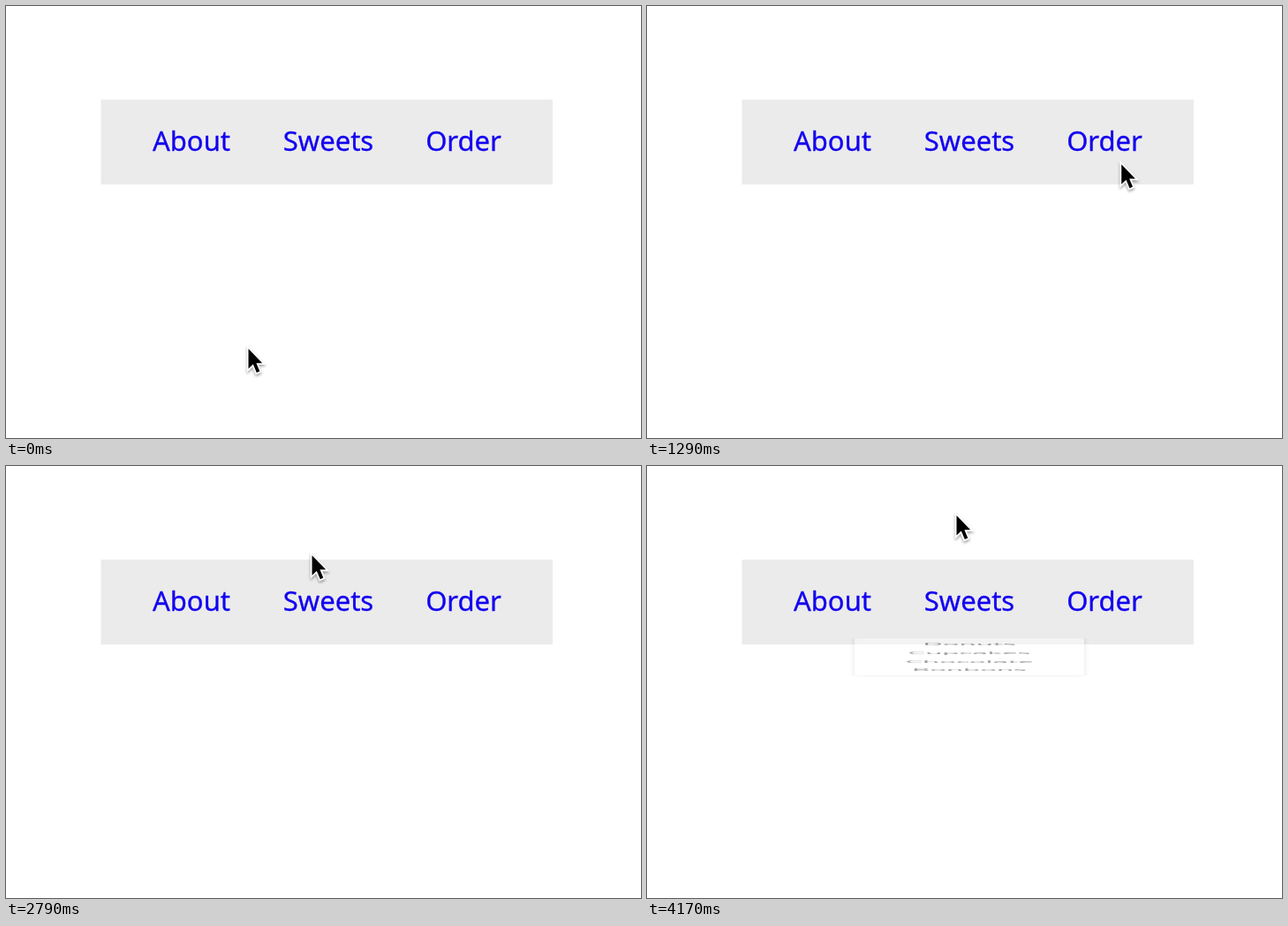
These frames come from a looping animation (719x489 px, 4210 ms). An HTML page:

```html
<!DOCTYPE html>
<html lang="en">
<head>
<meta charset="utf-8">
<title>Dropdown with delayed close</title>
<style>
  html, body { margin: 0; width: 100%; height: 100%; overflow: hidden; background: #fff; }
  svg { display: block; width: 719px; height: 489px; }
  text { font: 31px "Noto Sans", sans-serif; text-anchor: middle; stroke-width: .3; stroke-linejoin: round; }
  .links { fill: #1200f0; stroke: #1200f0; }
  .items { fill: #3a3a3a; stroke: #3a3a3a; }
  .panel { fill: #fff; filter: drop-shadow(0 2px 3px rgba(0, 0, 0, .25)); }
  #arrow { filter: drop-shadow(0 2px 1.5px rgba(0, 0, 0, .35)); }
  #beam { fill: none; stroke-linecap: round; }
</style>
</head>
<body>
<svg viewBox="0 0 719 489">
  <defs>
    <path id="beamShape" d="M-5.5 -14Q0 -14 0 -9V9Q0 14 -5.5 14M5.5 -14Q0 -14 0 -9M0 9Q0 14 5.5 14M-3 2H3"/>
  </defs>
  <rect x="107.5" y="106" width="511.5" height="96" fill="#ebebeb"/>
  <g class="links">
    <text x="210" y="164">About</text>
    <text x="365" y="164">Sweets</text>
    <text x="518" y="164">Order</text>
  </g>
  <g id="menu">
    <rect class="panel" x="235" width="260" height="310" rx="7"/>
    <g class="items" id="items"></g>
  </g>
  <g id="arrow">
    <path d="M.5 2V24.5L5.8 19.5L9.8 29L13.3 27.4L9.4 18.2H16.2Z" stroke="#fff" stroke-width="3.6" paint-order="stroke"/>
  </g>
  <g id="beam">
    <use href="#beamShape" stroke="#fff" stroke-width="4"/>
    <use href="#beamShape" stroke="#000" stroke-width="2"/>
  </g>
</svg>
<script>
const LOOP = 4210;
const $ = id => document.getElementById(id);
const menu = $('menu'), arrow = $('arrow'), beam = $('beam');

$('items').innerHTML = ['Donuts', 'Cupcakes', 'Chocolate', 'Bonbons']
  .map((name, i) => `<text x="365" y="${60 + 70.3 * i}">${name}</text>`).join('');
const linkBoxes = [...document.querySelectorAll('.links text')].map(link => link.getBBox());

// Turning points of the pointer
const keys = [
  { t: 40, x: 274, y: 386 },
  { t: 330, x: 262, y: 150 },
  { t: 500, x: 286, y: 12, hold: 170 },
  { t: 830, x: 338, y: 66 },
  { t: 1030, x: 420, y: 264 },
  { t: 1190, x: 500, y: 152 },
  { t: 1360, x: 548, y: 205 },
  { t: 1660, x: 435, y: 331 },
  { t: 1830, x: 396, y: 245 },
  { t: 2210, x: 346, y: 27, hold: 80 },
  { t: 2790, x: 346, y: 99 },
  { t: 3010, x: 350, y: 147, hold: 700 },
  { t: 3900, x: 350, y: 54 }
];

const clamp = v => Math.max(0, Math.min(1, v));
const smooth = v => v * v * (3 - 2 * v);
const leave = key => key.t + (key.hold || 0);
const slope = (i, axis) => (keys[i + 1][axis] - keys[i][axis]) / (keys[i + 1].t - leave(keys[i]));

// The pointer rests at pauses and at the extremes of each axis
function speed(i, axis) {
  if (i === 0 || i === keys.length - 1 || keys[i].hold) return 0;
  const a = slope(i - 1, axis), b = slope(i, axis);
  return a * b <= 0 ? 0 : 2 * a * b / (a + b);
}

// Monotone cubic interpolation of one axis
function along(t, axis) {
  let i = 0;
  while (i < keys.length - 2 && t >= keys[i + 1].t) i++;
  const from = keys[i], to = keys[i + 1], span = to.t - leave(from);
  const u = clamp((t - leave(from)) / span);
  return from[axis] + (to[axis] - from[axis]) * smooth(u)
    + span * u * (1 - u) * ((1 - u) * speed(i, axis) - u * speed(i + 1, axis));
}

function draw(now) {
  const t = now % LOOP;
  const x = along(t, 'x'), y = along(t, 'y');
  const overText = linkBoxes.some(b => x > b.x && x < b.x + b.width && y > b.y && y < b.y + b.height);
  arrow.style.display = overText ? 'none' : '';
  beam.style.display = overText ? '' : 'none';
  (overText ? beam : arrow).setAttribute('transform', `translate(${x} ${y})`);

  const open = 1 - (1 - clamp((t - 2950) / 240)) ** 2;
  const close = smooth(clamp((t - 3970) / 262));
  menu.style.display = open > 0 ? '' : 'none';
  menu.setAttribute('opacity', open * (1 - .64 * close));
  menu.setAttribute('transform', `translate(0 195) scale(1 ${open * (1 - close)})`);
  requestAnimationFrame(draw);
}
requestAnimationFrame(draw);
</script>
</body>
</html>
```
